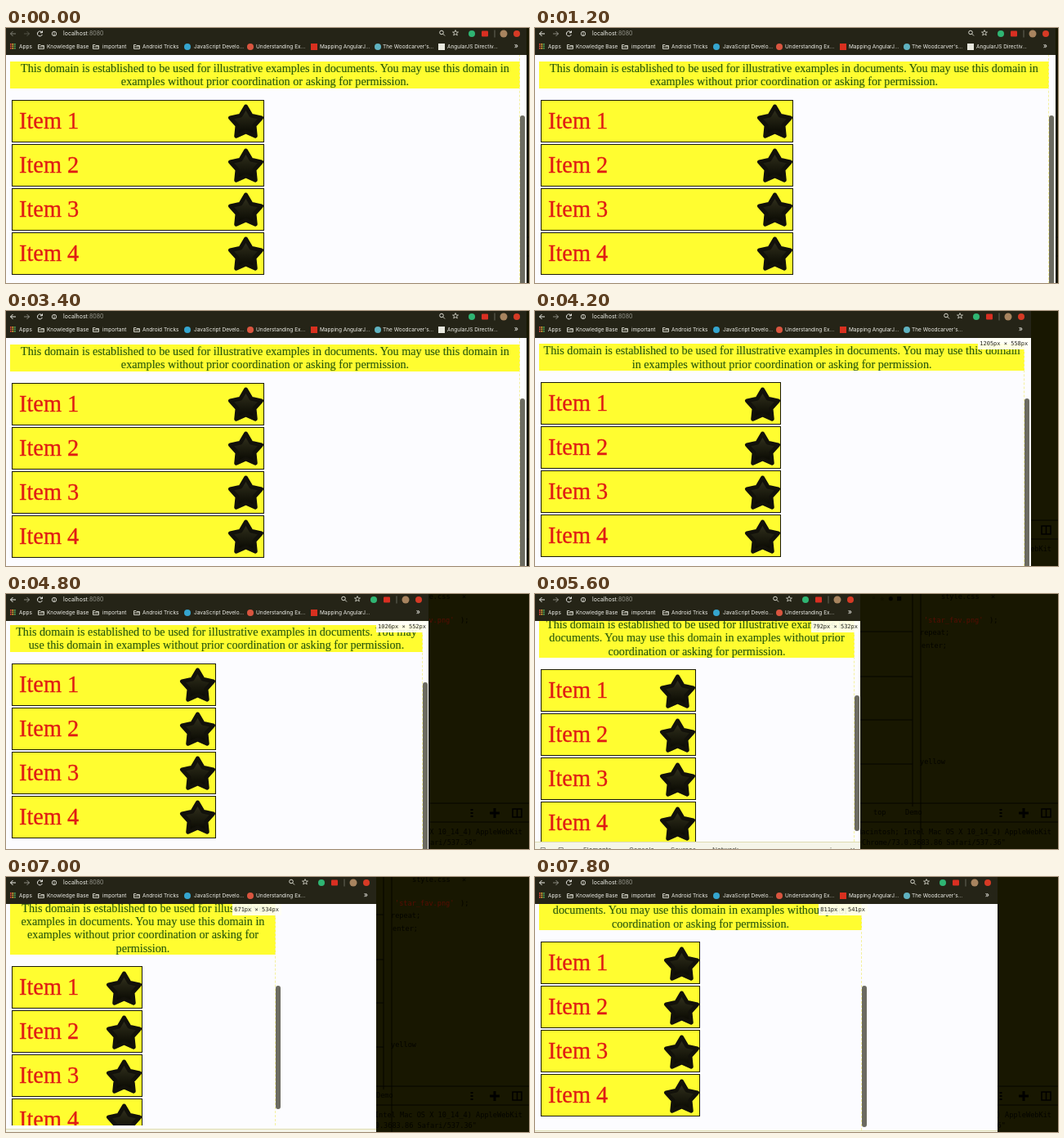
Recreate the animation shown at these times as an HTML page. Size 640 px wide and 312 px high, loop 8000 ms.

```html
<!DOCTYPE html>
<html lang="en">
<head>
<meta charset="utf-8">
<title>Responsive list</title>
<style>
  html, body { margin: 0; width: 100%; height: 100%; overflow: hidden; background: #181701; }
  #stage { position: absolute; left: 0; top: 0; width: 640px; height: 312px; overflow: hidden; background: #181701; }
  #stage svg { position: absolute; left: 0; top: 0; }
  #backdrop { font: 8.6px "DejaVu Sans Mono", monospace; fill: #040400; }
  #window { position: absolute; left: 0; top: 0; height: 312px; overflow: hidden; background: #fcfcff; }
  #bar { position: absolute; left: 0; top: 0; width: 100%; height: 33px; background: #252417; color: #f0f0ea;
         font: 6.5px/10px Inter, sans-serif; }
  #bar span { position: absolute; white-space: nowrap; }
  #bar .dot { box-sizing: border-box; transform: translate(-50%, -50%); }
  .mark { position: absolute; top: 17.5px; }
  #stage #nav { top: .7px; }
  #address { left: 70px; top: 1.7px; font-size: 7px; }
  #address i { color: #98988f; font-style: normal; }
  #view { position: absolute; left: 0; top: 32px; overflow: hidden; }
  #content { position: absolute; left: 5px; top: -32px; font: 14.2px/16.35px "Liberation Serif", serif; }
  #content p { margin: 0; background: #fffd30; color: #2b5a0c; text-align: center; -webkit-text-stroke: .15px; }
  #list { margin: 14.3px 0 0 2px; width: calc(50% - 3px); }
  .item { position: relative; box-sizing: border-box; height: 52px; margin-bottom: 2px; padding-left: 8px;
          border: 1.5px solid #1c1b08; background: #fffd30; color: #e01c14; font-size: 28.4px; line-height: 49px;
          -webkit-text-stroke: .3px; }
  #stage .item svg { left: auto; right: -1px; top: 2.5px; }
  #edge { position: absolute; top: 0; width: 0; height: 100%; border-left: 1px dashed #f4f0a0; }
  #thumb { position: absolute; width: 5.5px; border-radius: 3px; background: #6c6b61; }
  #size { position: absolute; top: 32.5px; height: 14px; padding: 0 3px 0 2px; background: rgba(255,255,245,.9);
          color: #23231c; font: 7px/14px "DejaVu Sans Mono", monospace; white-space: pre; }
  #tools { position: absolute; left: 0; width: 100%; height: 20px; border-top: 1px solid #dedcb0;
           background: #f5f5e8; color: #55554c; font: 8px/18px Inter, sans-serif; }
  #tools span { position: absolute; top: 0; }
</style>
</head>
<body>
<div id="stage">
  <svg id="backdrop" width="640" height="312">
    <path d="M462 0V260M472 0V312M398 46H462M398 101H462M398 154H462M398 208H462M398 256H640M398 279H640" stroke="#050500" fill="none"/>
    <text x="497" y="6">style.css</text><text x="558" y="6">×</text>
    <text x="412" y="8">◦ ☆ ● ■</text>
    <text x="476" y="35" fill="#570d02">'star_fav.png'</text><text x="556" y="35">);</text>
    <text x="471" y="50">repeat;</text><text x="473" y="66">enter;</text>
    <text x="471" y="208">yellow</text>
    <text x="414" y="270">top</text><text x="453" y="270">Demo</text>
    <path d="M570 263v2m0 2v2m0 2v2M592 268h12M598 262v12" stroke="#000" stroke-width="3"/>
    <path d="M620 263h11v10h-11zM625.5 263v10" stroke="#000" stroke-width="1.5" fill="none"/>
    <text x="394" y="294">Macintosh; Intel Mac OS X 10_14_4) AppleWebKit</text>
    <text x="400" y="307">Chrome/73.0.3683.86 Safari/537.36"</text>
  </svg>
  <div id="window">
    <div id="view">
      <div id="content">
        <p>This domain is established to be used for illustrative examples in documents. You may use this domain in examples without prior coordination or asking for permission.</p>
        <div id="list"></div>
      </div>
      <div id="edge"></div>
    </div>
    <div id="tools">
      <span style="left:6px">▢</span><span style="left:28px">▢</span>
      <span style="left:59px">Elements</span><span style="left:115px">Console</span>
      <span style="left:166px">Sources</span><span style="left:217px">Network</span>
      <span style="right:32px">⋮</span><span style="right:6px">✕</span>
    </div>
    <div id="thumb"></div>
    <div id="bar">
      <svg id="nav" width="130" height="32" fill="none" stroke="#f0f0ea">
        <g id="arrows"><path d="M12 6H5.5M8.5 3L5.5 6L8.5 9"/><path d="M22 6H28.5M25.5 3L28.5 6L25.5 9" opacity=".5"/></g>
        <path d="M44 4.3A3 3 0 1 0 44.3 7M44.5 2.5V4.8H42"/>
        <g stroke-width=".8"><circle cx="59" cy="6" r="2.7"/><path d="M59 5.5V8M59 4V4.8"/></g>
      </svg>
      <span id="address">localhost<i>:8080</i></span>
    </div>
    <div id="size"></div>
  </div>
</div>
<script>
const $ = id => document.getElementById(id);
const LOOP = 8000, STEP = 200;

const starPoints = Array.from({ length: 10 }, (_, i) => {
  const r = i % 2 ? 11 : 20, a = i * Math.PI / 5;
  return `${(22.5 + r * Math.sin(a)).toFixed(2)},${(25 - r * Math.cos(a)).toFixed(2)}`;
}).join(' ');

$('list').innerHTML = [1, 2, 3, 4].map(n => `<div class="item">Item ${n}
  <svg width="45" height="46"><defs><linearGradient id="shade${n}" x2="0" y2="1">
  <stop stop-color="#35341f"/><stop offset="1" stop-color="#060600"/></linearGradient></defs>
  <polygon points="${starPoints}" fill="url(#shade${n})" stroke="#12110a" stroke-width="5" stroke-linejoin="round"/></svg></div>`).join('');

// Bookmarks: icon centre, text start, text end, label, icon art
const folder = '<svg width="9" height="8" style="left:-4px;top:1px" fill="none" stroke="#c9c9be"><path d="M.5 6.5V1.5H3L4 2.5H7.5V6.5ZM.5 4H7.5"/></svg>';
const grid = '<svg width="9" height="9" style="left:-3px;top:1.5px">' +
  [...Array(9)].map((_, i) => `<rect x="${i % 3 * 2.5}" y="${(i / 3 | 0) * 2.5}" width="1.7" height="1.7" fill="${['#e0483c', '#e8b53a', '#4ea35c'][i % 3]}"/>`).join('') + '</svg>';
const disc = (color, radius = '50%') =>
  `<span class="dot" style="left:0;top:5px;width:8px;height:8px;border-radius:${radius};background:${color}"></span>`;
const marks = [
  [8, 16, 31, 'Apps', grid],
  [43, 50, 99, 'Knowledge Base', folder],
  [110, 118, 147, 'important', folder],
  [160, 167, 210, 'Android Tricks', folder],
  [222, 230, 286, 'JavaScript Develo...', disc('#35a5cf')],
  [299, 306, 364, 'Understanding Ex...', disc('#d9553f')],
  [377, 384, 441, 'Mapping AngularJ...', disc('#d8301f', 0)],
  [455, 461, 515, "The Woodcarver's...", disc('#5fb2c0')],
  [533, 540, 598, 'AngularJS Directiv...', disc('#e9e9df', 0)]
].map(([icon, start, end, label, art]) => {
  const el = document.createElement('div');
  el.className = 'mark';
  el.style.left = icon + 'px';
  el.innerHTML = `${art}<span style="left:${start - icon}px">${label}</span>`;
  $('bar').append(el);
  return { el, end };
});

// Controls that follow the right edge of the window
const rightSvg = `<svg width="16" height="14" style="left:auto;right:95px" fill="none" stroke="#d8d8cd"><circle cx="7" cy="5.5" r="2.3"/><path d="M8.7 7.2L11 9.5"/></svg>
<svg width="12" height="14" style="left:auto;right:81px" fill="none" stroke="#d8d8cd" stroke-width=".8"><path d="M6 2.5L7 5H9.5L7.5 6.5L8.3 9L6 7.5L3.7 9L4.5 6.5L2.5 5H5Z"/></svg>`;
const control = (offset, color, w, h, radius) =>
  `<span class="dot" style="left:calc(100% - ${offset}px);top:6.5px;width:${w}px;height:${h}px;border-radius:${radius};background:${color}"></span>`;
$('bar').insertAdjacentHTML('beforeend', rightSvg +
  control(67, '#2fb573', 8, 8, '50%') + control(51, '#d92f22', 8, 7, '1px') +
  control(39, '#67675b', 1, 9, 0) + control(28, '#a8845f', 9, 9, '50%') +
  control(12, '#d63a25', 8, 8, '50%') +
  '<span style="right:10px;top:17px;font-size:9px">»</span>');

// time, window width, view width, label width, label height, content top, view bottom, thumb top, thumb bottom
const keys = [
  [4000, 637, 636, 1264, 560, 41, 318, 107, 320],
  [4800, 517, 517, 1026, 552, 38, 314, 108, 314],
  [5600, 398, 398, 792, 532, 29, 303, 124, 290],
  [6200, 337, 337, 671, 532, 29, 303, 132, 284],
  [7000, 453, 337, 671, 534, 29.5, 304, 133, 284],
  [7800, 566, 407, 811, 541, 16, 310, 133, 306]
];

function pose(t) {
  if (t <= keys[0][0]) return keys[0];
  const next = keys.findIndex(k => k[0] >= t);
  if (next < 0) return keys[keys.length - 1];
  const a = keys[next - 1], b = keys[next], u = (t - a[0]) / (b[0] - a[0]);
  return a.map((v, i) => v + (b[i] - v) * u);
}

const px = (id, values) => {
  for (const name in values) $(id).style[name] = values[name] + 'px';
};

function draw(now) {
  const t = Math.floor(now % LOOP / STEP) * STEP;
  const [, width, view, labelW, labelH, top, bottom, thumbTop, thumbBottom] = pose(t);
  px('window', { width });
  px('view', { width: view, height: bottom - 32 });
  px('content', { width: view - 12, top: top - 32 });
  px('edge', { left: view - 8 });
  px('thumb', { left: view - 7, top: thumbTop, height: thumbBottom - thumbTop });
  px('tools', { top: t >= 6400 ? Math.max(bottom, 308) : bottom });
  px('size', { right: width - view });
  $('size').textContent = `${Math.round(labelW)}px × ${Math.round(labelH)}px`;
  $('size').style.display = t > 4000 ? '' : 'none';
  $('arrows').style.opacity = t < 400 ? .45 : 1;
  for (const { el, end } of marks) el.style.display = end < width - 20 ? '' : 'none';
  requestAnimationFrame(draw);
}
draw(performance.now());
</script>
</body>
</html>
```
